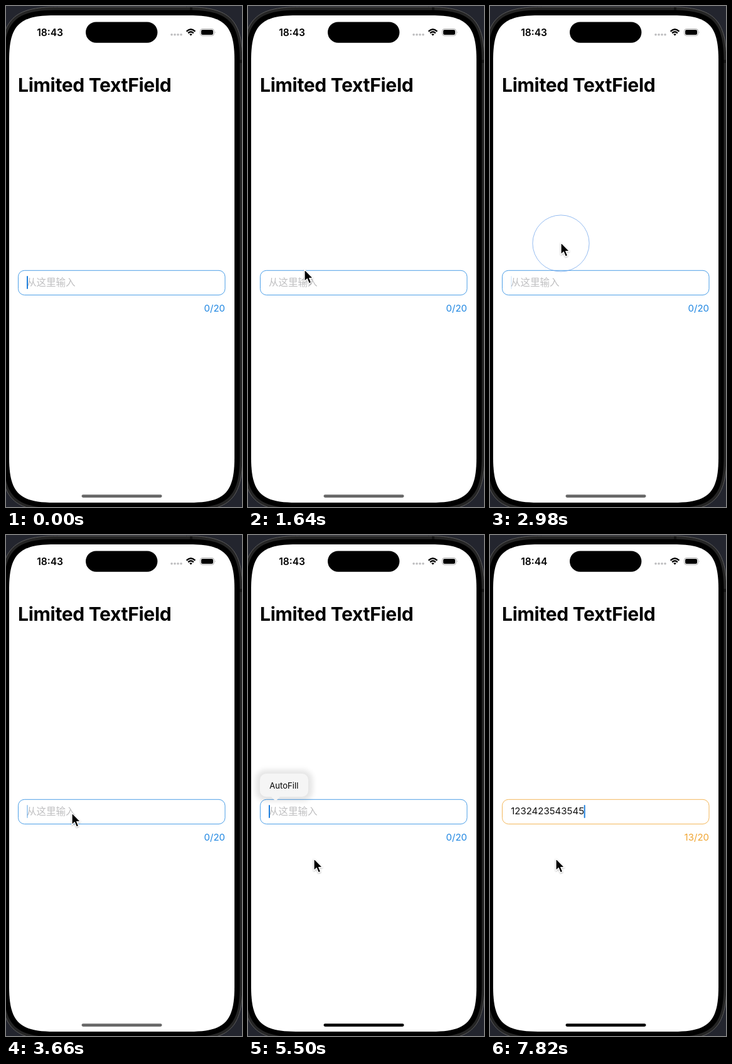
An HTML page that plays this animation: 376 by 800 pixels, repeating every 8 s.

```html
<!DOCTYPE html>
<html lang="en">
<head>
<meta charset="utf-8">
<title>Limited TextField</title>
<style>
  html, body { margin: 0; width: 100%; height: 100%; overflow: hidden; background: #23252e; }
  svg { display: block; width: 100%; height: 100%; }
  text { font-family: Inter, Roboto, sans-serif; }
  .cjk { font-family: "Noto Sans CJK SC", "Noto Sans CJK", sans-serif; font-weight: 300; }
</style>
</head>
<body>
<svg viewBox="0 0 376 800">
  <defs>
    <filter id="soft" x="-30%" y="-50%" width="160%" height="200%">
      <feGaussianBlur stdDeviation="4.5"/>
    </filter>
    <filter id="drop" x="-50%" y="-50%" width="200%" height="200%">
      <feDropShadow dx="0" dy="1" stdDeviation="1" flood-opacity=".35"/>
    </filter>
  </defs>

  <!-- phone body -->
  <rect width="376" height="800" fill="#23252e"/>
  <path id="rim" fill="#252525" stroke="#5c5c5c"/>
  <rect x="293" y="2" width="4" height="5" fill="#141414"/>
  <rect x="372" y="86" width="4" height="5" fill="#141414"/>
  <path id="bezel"/>
  <path id="screen" fill="#fff"/>
  <rect x="127" y="25.5" width="114.4" height="33.2" rx="16.6"/>

  <!-- status bar -->
  <text id="clock" x="49.2" y="47.5" font-size="15.6" font-weight="600">18:43</text>
  <g fill="#bdbdbf">
    <circle cx="264" cy="45.8" r="1.8"/><circle cx="269" cy="45.8" r="1.8"/>
    <circle cx="274" cy="45.8" r="1.8"/><circle cx="279" cy="45.8" r="1.8"/>
  </g>
  <g fill="none" stroke="#000" stroke-width="2.4">
    <path d="M287.6 40.6Q294.5 34 301.4 40.6"/>
    <path d="M290.2 43.4Q294.5 39.3 298.8 43.4"/>
  </g>
  <path d="M292.2 45.2Q294.5 43.2 296.8 45.2L294.5 47.6Z"/>
  <rect x="309.5" y="36.5" width="22" height="11" rx="3.6" fill="none" stroke="#a9a9a9"/>
  <rect x="311" y="38" width="19" height="8" rx="2.2"/>
  <path d="M333 40.2q1.6 1.8 0 3.6z" fill="#a9a9a9"/>

  <text x="19.1" y="137" font-size="30" font-weight="700" letter-spacing="-.32">Limited TextField</text>

  <!-- field -->
  <rect id="frame" x="19.5" y="422.3" width="329.5" height="39.2" rx="10" fill="none"/>
  <text id="hint" class="cjk" x="33" y="446.5" font-size="15.5" fill="#bfbfc1">从这里输入</text>
  <text id="typed" x="33.2" y="446.3" font-size="15" fill="#111"></text>
  <rect id="caret" y="431" width="2" height="21" rx="1" fill="#1f7fdc"/>
  <text id="count" x="349" y="487.5" font-size="15" text-anchor="end"></text>

  <g id="popup">
    <rect x="12" y="375" width="91" height="50" rx="16" opacity=".1" filter="url(#soft)"/>
    <path d="M29 381H86a10 10 0 0 1 10 10V408a10 10 0 0 1-10 10H51L45.5 423.5Q44 425 42.5 423.5L37 418H29a10 10 0 0 1-10-10V391a10 10 0 0 1 10-10Z" fill="#f5f5f5"/>
    <text x="34.3" y="405.2" font-size="13.1">AutoFill</text>
  </g>

  <rect id="home" x="120.5" y="780.2" width="128" height="4.8" rx="2.4"/>
  <circle id="ring" fill="none" stroke="#5b98e8"/>
  <g id="mouse" filter="url(#drop)">
    <path transform="translate(0 .8) scale(1.1)" d="M0 0V17.2L3.9 13.6L6.6 20.2L9.7 18.9L7 12.5H12.2Z" stroke="#fff" stroke-width="1.1" stroke-linejoin="round"/>
  </g>
</svg>
<script>
const LOOP = 8000;
const TEXT = "1232423543545";
const KEY_TIMES = [5540, 5620, 5700, 5780, 5860, 5940, 5980, 6380, 6420, 6460, 6660, 6740, 7040];
const BLUE = [32, 135, 226], ORANGE = [240, 165, 50];
const TAPS = [{ t: 2755, x: 113, y: 379 }, { t: 3700, x: 105, y: 443 }];
// time, x, y
const PATH = [
  [40, 40, 800], [500, 97, 550], [1420, 97, 550], [1640, 90, 420],
  [1800, 90, 420], [2200, 112, 378], [2460, 112, 378], [2740, 113, 377],
  [3060, 113, 377], [3640, 105, 443], [3800, 105, 443], [4310, 105, 516]
];

const $ = id => document.getElementById(id);
const [clock, frame, hint, typed, caret, count, popup, home, ring, mouse] =
  ["clock", "frame", "hint", "typed", "caret", "count", "popup", "home", "ring", "mouse"].map($);

const ramp = (t, a, b) => Math.min(1, Math.max(0, (t - a) / (b - a)));
const smooth = u => u * u * (3 - 2 * u);
const mix = (a, b, u) => a + (b - a) * u;
const set = (el, attrs) => { for (const k in attrs) el.setAttribute(k, attrs[k]); };
const write = (el, s) => { if (el.textContent !== s) el.textContent = s; };

// rectangle whose corners bend gradually, like the device shell
function shell(x, y, w, h, r) {
  const a = 1.4 * r, k = 0.314 * r, X = x + w, Y = y + h;
  return `M${x} ${y + a}C${x} ${y + k} ${x + k} ${y} ${x + a} ${y}` +
    `H${X - a}C${X - k} ${y} ${X} ${y + k} ${X} ${y + a}` +
    `V${Y - a}C${X} ${Y - k} ${X - k} ${Y} ${X - a} ${Y}` +
    `H${x + a}C${x + k} ${Y} ${x} ${Y - k} ${x} ${Y - a}Z`;
}
set($("rim"), { d: shell(-8, 1.5, 385, 805, 64) });
set($("bezel"), { d: shell(-3.5, 6.5, 376, 795, 59) });
set($("screen"), { d: shell(5, 15, 359, 778, 51) });

// one blink: fade out, pause, fade in
const blink = p => 1 - ramp(p, 0, 160) + ramp(p, 320, 520);

function caretAlpha(t) {
  if (t < 600) return blink(t - 20);
  if (t < 3760) return blink((t - 680) % 720);
  return blink(t - 7300);
}

function mouseAt(t) {
  let i = 0;
  while (i < PATH.length - 2 && t > PATH[i + 1][0]) i++;
  const [t0, x0, y0] = PATH[i], [t1, x1, y1] = PATH[i + 1];
  const u = smooth(ramp(t, t0, t1));
  return [mix(x0, x1, u), mix(y0, y1, u)];
}

function draw(t) {
  const n = KEY_TIMES.filter(k => t >= k).length;
  write(typed, TEXT.slice(0, n));
  write(count, n + "/20");
  write(clock, t < 6660 ? "18:43" : "18:44");
  set(hint, { opacity: n ? 0 : 1 });

  const warm = smooth(ramp(t, 6380, 6520));
  const color = `rgb(${BLUE.map((c, i) => Math.round(mix(c, ORANGE[i], warm)))})`;
  set(frame, { stroke: color, "stroke-opacity": .8 });
  set(count, { fill: color });
  set(caret, { x: n ? 32.8 + typed.getComputedTextLength() : 33, opacity: caretAlpha(t) });

  set(popup, { opacity: ramp(t, 4250, 4500) * (1 - ramp(t, 5500, 5720)) });
  const grey = Math.round(mix(104, 0, ramp(t, 4450, 4900)));
  set(home, { fill: `rgb(${grey},${grey},${grey})` });

  const tap = TAPS.find(p => t >= p.t && t < p.t + 380);
  const age = tap ? t - tap.t : 0;
  set(ring, {
    cx: tap ? tap.x : 0, cy: tap ? tap.y : 0,
    r: 48 * (1 - (1 - ramp(age, 0, 300)) ** 2),
    opacity: tap ? Math.min(1, (380 - age) / 240) : 0
  });

  const [x, y] = mouseAt(t);
  set(mouse, { transform: `translate(${x} ${y})`, opacity: t < 40 ? 0 : 1 });
}

const start = performance.now();
function tick() {
  draw((performance.now() - start) % LOOP);
  requestAnimationFrame(tick);
}
draw(0);
requestAnimationFrame(tick);
</script>
</body>
</html>
```
